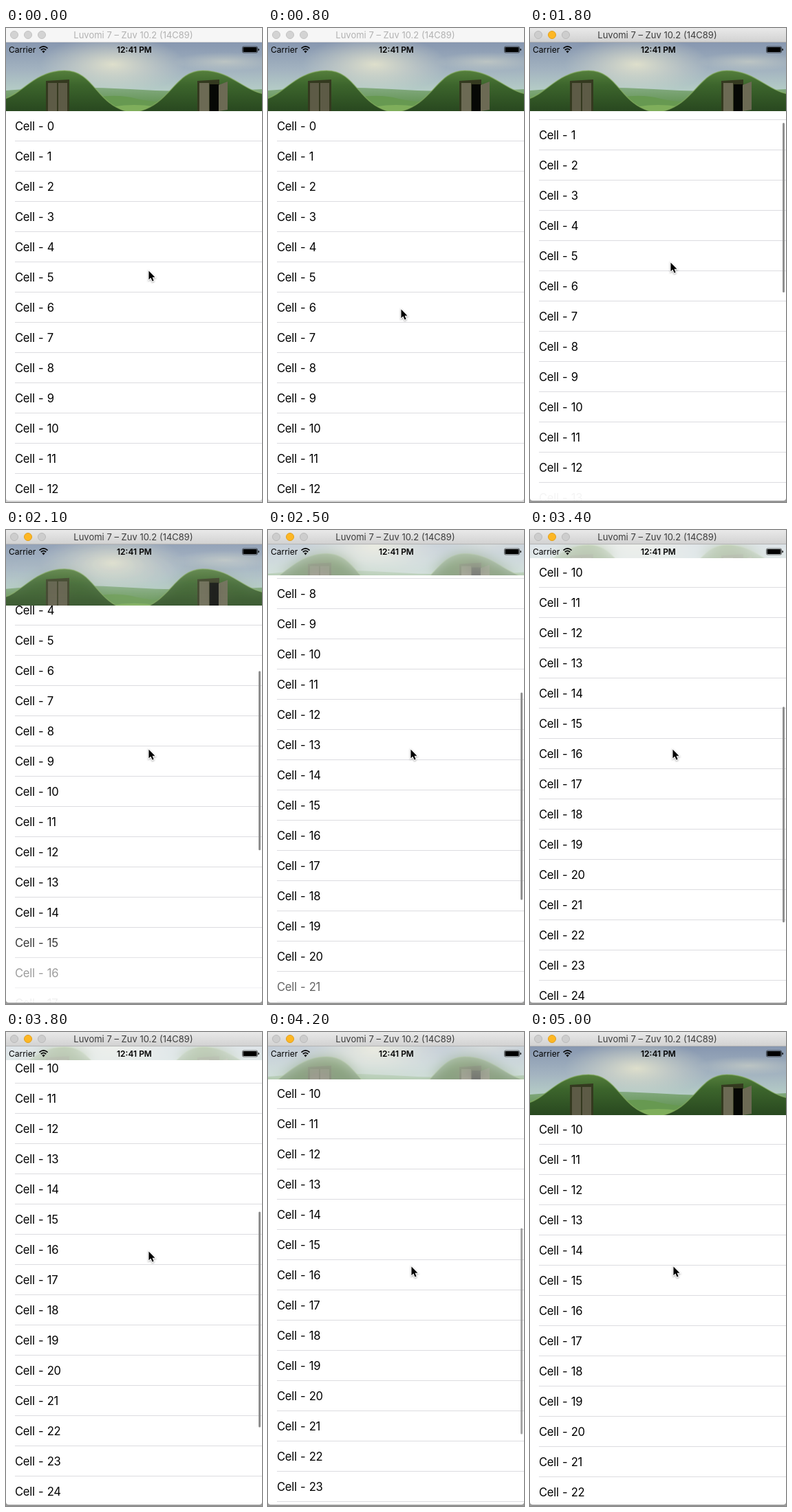
An HTML page for the animation above (5100 ms loop, 372 px wide and 690 px high).

```html
<!DOCTYPE html>
<html lang="en">
<head>
<meta charset="utf-8">
<title>Collapsing header</title>
<style>
html, body { margin: 0; width: 100%; height: 100%; overflow: hidden; background: #fff; }
body { font-family: Inter, "Liberation Sans", sans-serif; color: #000; }
#stage { position: relative; width: 372px; height: 690px; overflow: hidden; background: #d2d2d2; }
#stage.active { background: #9a9a9a; }
#stage > * { position: absolute; }

#title {
  left: 0; top: 0; width: 372px; height: 20px; line-height: 20px;
  background: #f6f6f6; border-bottom: 1px solid #d8d8d8;
  font-size: 13px; text-align: center; text-indent: -2px; color: #b2b2b2;
}
.active #title { background: linear-gradient(#e9e9e9, #d2d2d2); border-color: #b4b4b4; color: #3c3c3c; }
#title i {
  position: absolute; top: 4px; width: 12px; height: 12px; box-sizing: border-box;
  border-radius: 50%; background: #d3d3d3; border: 1px solid #c3c3c3;
}
.active #title i { background: #cdcdcd; border-color: #bababa; }
.active #title i:nth-of-type(2) { background: #fdb724; border-color: #e2a01c; }

#list { left: 0; top: 21px; width: 372px; height: 667px; overflow: hidden; background: #fff; border-radius: 0 0 4px 4px; }
#rows { position: absolute; left: 13px; top: 0; width: 359px; }
#rows div {
  height: 43px; line-height: 44px; border-bottom: 1px solid #dcdce0;
  font-size: 16.6px; letter-spacing: -.25px; word-spacing: .8px; white-space: pre;
}
#bar { left: 367px; top: 0; width: 3px; border-radius: 2px; background: #8f8f8f; }

#header { left: 0; top: 21px; width: 372px; height: 100px; overflow: hidden; background: #cdd8cf; }
#scene { position: absolute; left: 0; top: 0; }
#veil {
  position: absolute; inset: 0; background: rgba(255, 255, 255, .64);
  -webkit-backdrop-filter: blur(9px); backdrop-filter: blur(9px);
}
#status { left: 0; top: 21px; }
#status text { font-size: 12px; }
#cursor { left: 0; top: 1px; overflow: visible; filter: drop-shadow(0 1px 1px rgba(0, 0, 0, .35)); }
</style>
</head>
<body>
<div id="stage">
  <div id="list"><div id="rows"></div></div>
  <div id="bar"></div>

  <div id="header">
    <svg id="scene" width="372" height="100">
      <defs>
        <linearGradient id="sky" x2="0" y2="1">
          <stop offset="0" stop-color="#8797b0"/>
          <stop offset=".4" stop-color="#a3b3c0"/>
          <stop offset=".68" stop-color="#b4cbc6"/>
        </linearGradient>
        <radialGradient id="glow">
          <stop offset="0" stop-color="#eeebcf"/>
          <stop offset="1" stop-color="#e0e2cf" stop-opacity="0"/>
        </radialGradient>
        <linearGradient id="hill" x2="0" y2="1">
          <stop offset="0" stop-color="#557f3c"/>
          <stop offset=".35" stop-color="#3c652c"/>
          <stop offset="1" stop-color="#28471f"/>
        </linearGradient>
        <linearGradient id="field" x2="0" y2="1">
          <stop offset="0" stop-color="#83aa80"/>
          <stop offset="1" stop-color="#568a42"/>
        </linearGradient>
      </defs>
      <rect width="372" height="100" fill="url(#sky)"/>
      <ellipse cx="155" cy="32" rx="105" ry="42" fill="url(#glow)" opacity=".8"/>
      <ellipse cx="318" cy="28" rx="75" ry="14" fill="url(#glow)" opacity=".4"/>
      <path d="M0 70Q90 62 180 68T372 68V100H0Z" fill="url(#field)"/>
      <path d="M110 86Q150 72 190 82T270 78V100H110Z" fill="#679951"/>
      <path d="M130 100Q185 82 245 100Z" fill="#7fae5b"/>
      <g fill="url(#hill)" stroke="#86ad5e" stroke-opacity=".6" stroke-width="1.5">
        <path d="M-2 82C22 76 42 41 85 41C128 41 130 90 178 101H-2Z"/>
        <path d="M190 101C240 90 245 41 286 41C326 41 342 68 374 75V101Z"/>
      </g>
      <path d="M58 56L92 54V100H58Z" fill="#34391f"/>
      <path d="M61 59H74V100H61ZM76 59H89V100H76Z" fill="#5d5b46"/>
      <path d="M278 56L310 54V100H278Z" fill="#34391f"/>
      <path d="M281 59H295V100H281ZM309 62L322 57V98L309 100Z" fill="#6c6a54"/>
      <path d="M296 61H309V100H296Z" fill="#060805"/>
    </svg>
    <div id="veil"></div>
  </div>

  <svg id="status" width="372" height="20">
    <text x="4" y="14.5">Carrier</text>
    <g fill="none" stroke="#000" stroke-width="1.7">
      <path d="M48.5 8.6Q54.5 3.2 60.5 8.6M50.8 11Q54.5 7.8 58.2 11"/>
    </g>
    <path d="M54.5 15.4L52.3 12.8Q54.5 11.2 56.7 12.8Z"/>
    <text x="186.5" y="14.5" text-anchor="middle" font-weight="600">12:41 PM</text>
    <rect x="343.5" y="6" width="22" height="9" rx="1.8" fill="none" stroke="#000" stroke-opacity=".55"/>
    <rect x="344.5" y="7" width="20" height="7" rx=".8"/>
    <path d="M366.5 8.8Q368 9 368 10.5T366.5 12.2Z"/>
  </svg>

  <div id="title"><i style="left:6px"></i><i style="left:26px"></i><i style="left:46px"></i>Luvomi 7 – Zuv 10.2 (14C89)</div>

  <svg id="cursor" width="12" height="18">
    <path d="M.5 .5V13.2L3.4 10.6L5.6 15.6L7.7 14.7L5.6 9.8H9.5Z" stroke="#fff" paint-order="stroke" stroke-width="2"/>
  </svg>
</div>

<script>
const LOOP = 5100, STEP = 100, ROW = 44, ROWS = 30;
const TOP = 21, BOTTOM = 688, OPEN = 100, CLOSED = 20;
const $ = id => document.getElementById(id);
const clamp = x => Math.min(1, Math.max(0, x));
const ramp = (t, from, span) => clamp((t - from) / span);
const smooth = x => x * x * (3 - 2 * x);

// Linear interpolation through [time, value, ...] keys.
function track(keys, t, i = 1) {
  const n = keys.findIndex(k => k[0] > t);
  if (n < 0) return keys[keys.length - 1][i];
  if (n === 0) return keys[0][i];
  const a = keys[n - 1], b = keys[n];
  return a[i] + (b[i] - a[i]) * (t - a[0]) / (b[0] - a[0]);
}

const pointer = [
  [0, 207, 352], [600, 194, 402], [700, 193, 408], [1300, 193, 408],
  [1700, 200, 388], [1800, 204, 340], [1900, 207, 318],
  [3800, 207, 318], [3960, 208, 340]
];
const drag = [[1765, 0], [1800, 31], [1900, 43]];

// Flick with exponential slow-down, then a short pull back.
const glide = t => 455.8 - 108.8 * Math.exp((2500 - t) / 450);
function offset(t) {
  if (t < 1900) return track(drag, t);
  if (t < 3820) return glide(t);
  return glide(3820) + (441 - glide(3820)) * smooth(ramp(t, 3820, 160));
}

const collapse = t => smooth(ramp(t, 1870, 1000)) - smooth(ramp(t, 3800, 1000));
const headerHeight = t => OPEN - (OPEN - CLOSED) * collapse(t);
const firstRow = t => headerHeight(t) - offset(t);

// Moment at which a row first enters the screen from below.
function entryTime(n) {
  for (let t = 0; t < LOOP; t += 5)
    if (TOP + firstRow(t) + n * ROW < BOTTOM) return t;
  return LOOP;
}

const rows = Array.from({ length: ROWS }, (_, n) => {
  const el = document.createElement("div");
  el.textContent = "Cell - " + n;
  $("rows").append(el);
  return { el, enter: entryTime(n) };
});

function draw(t) {
  const h = headerHeight(t), d = h - CLOSED;
  $("stage").classList.toggle("active", t >= 1600);
  $("rows").style.transform = `translateY(${Math.round(firstRow(t))}px)`;
  for (const { el, enter } of rows)
    el.style.opacity = enter ? smooth(ramp(t, enter, 200)) : 1;

  $("header").style.height = Math.round(h) + "px";
  $("scene").style.transform = `translateY(${(h - OPEN) / 2}px)`;
  $("veil").style.opacity = collapse(t);

  const bar = $("bar").style;
  bar.height = 314 - .31 * d - .0066 * d * d + "px";
  bar.transform = `translateY(${TOP + h + 2 + .486 * offset(t)}px)`;
  bar.opacity = ramp(t, 1750, 50) - ramp(t, 4150, 250);

  $("cursor").style.transform = `translate(${track(pointer, t, 1)}px, ${track(pointer, t, 2)}px)`;
}

const start = performance.now();
function tick() {
  const t = (performance.now() - start) % LOOP;
  draw(Math.floor(t / STEP) * STEP);
  requestAnimationFrame(tick);
}
tick();
</script>
</body>
</html>
```
